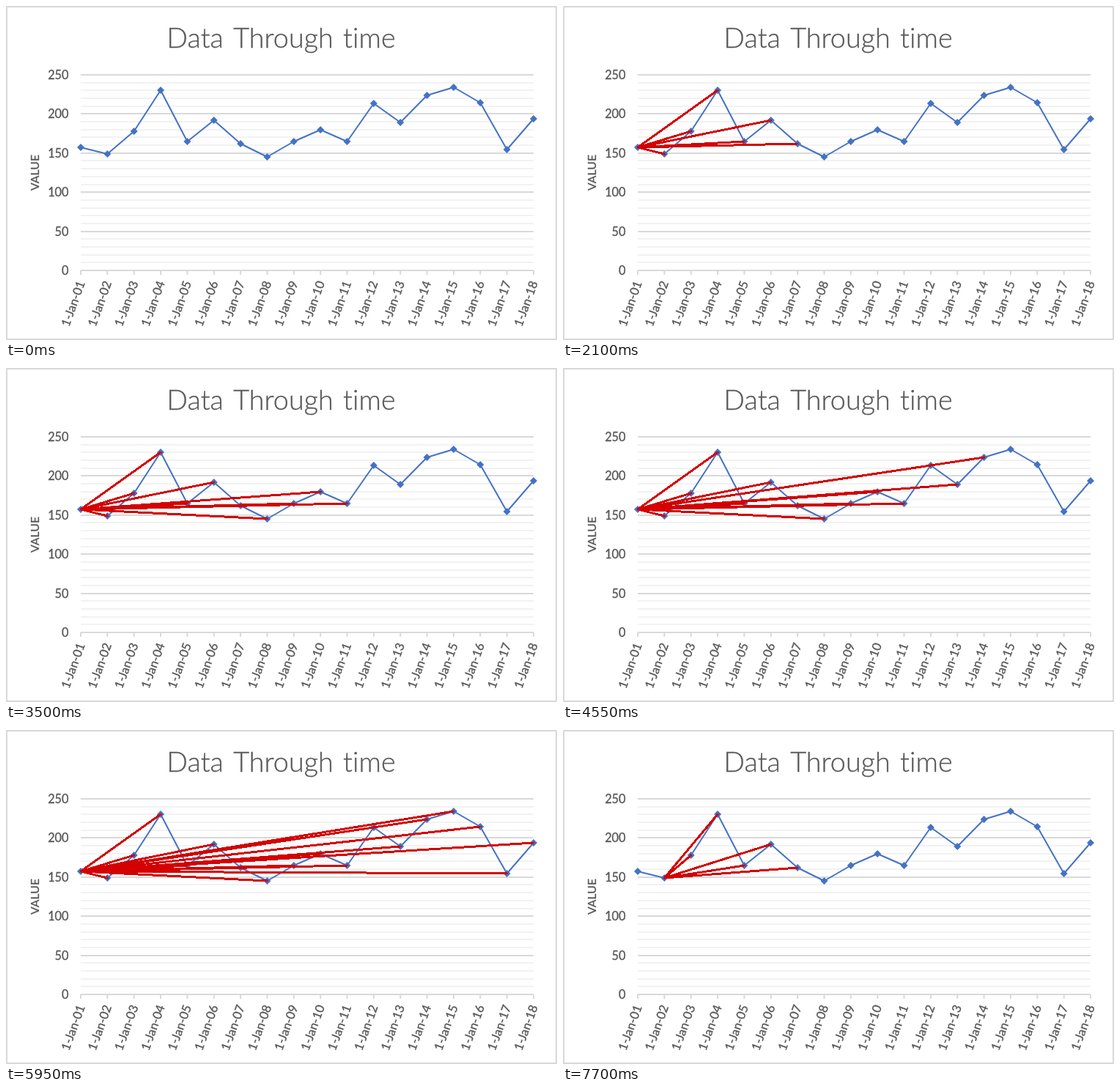
An HTML page with a canvas for the animation above (8000 ms loop, 752 px wide and 456 px high).

```html
<!DOCTYPE html>
<html lang="en">
<head>
<meta charset="utf-8">
<title>Data Through time</title>
<style>
  html, body { margin: 0; width: 100%; height: 100%; overflow: hidden; background: #fff; }
  canvas, svg { position: absolute; left: 0; top: 0; }
  path { fill: none; stroke: #d40000; stroke-width: 3; stroke-linecap: round; shape-rendering: crispEdges; }
</style>
</head>
<body>
<canvas width="752" height="456"></canvas>
<svg width="752" height="456"><path/></svg>
<script>
const ctx = document.querySelector('canvas').getContext('2d');
const fan = document.querySelector('path');
const LOOP = 8000, STEP = 350;
const LEFT = 102, RIGHT = 720, TOP = 94, BASE = 361;
const GREY = '#595959', BLUE = '#4472c4', GRID = '#d9d9d9';
const heights = [193, 202, 171, 115, 185, 156, 188, 206, 185, 169, 185, 133, 159, 122, 111, 132, 196, 154];
const last = heights.length - 1;
const points = heights.map((y, i) => [LEFT + (RIGHT - LEFT) * i / last, y]);

function line(path, color, width = 2) {
  ctx.strokeStyle = color;
  ctx.lineWidth = width;
  ctx.beginPath();
  path.forEach(([x, y]) => ctx.lineTo(x, y));
  ctx.stroke();
}

function label(text, x, y, size, align, angle = 0, weight = 400) {
  ctx.save();
  ctx.translate(x, y);
  ctx.rotate(angle * Math.PI / 180);
  ctx.font = `${weight} ${size}px Lato, sans-serif`;
  ctx.textAlign = align;
  ctx.fillStyle = ctx.strokeStyle = GREY;
  ctx.lineWidth = 0.35;
  ctx.fillText(text, 0, 0);
  ctx.strokeText(text, 0, 0);
  ctx.restore();
}

function drawChart() {
  ctx.fillStyle = '#fff';
  ctx.fillRect(0, 0, 752, 456);
  ctx.strokeStyle = GRID;
  ctx.lineWidth = 2;
  ctx.strokeRect(1, 1, 750, 454);

  for (let v = 0; v <= 250; v += 10) {
    const y = Math.round(BASE - (BASE - TOP) * v / 250);
    const major = v % 50 === 0;
    line([[LEFT, y], [RIGHT, y]], major ? GRID : '#f2f2f2');
    if (major) label(v, 85.5, y + 5.5, 16.3, 'right');
  }

  ctx.letterSpacing = '0.01px'; // turns ligatures off
  ctx.wordSpacing = '3px';
  label('Data Through time', 375.5, 57, 37.8, 'center', 0, 300);
  label('VALUE', 45, 227.5, 15.8, 'center', -90);

  points.forEach(([x], i) => {
    line([[x, BASE], [x, BASE + 6]], GRID);
    label('1-Jan-' + String(i + 1).padStart(2, '0'), x + 6, 378, 16.6, 'right', -70);
  });

  ctx.lineJoin = 'round';
  line(points, BLUE);
  ctx.fillStyle = BLUE;
  for (const [x, y] of points) {
    ctx.beginPath();
    ctx.moveTo(x, y - 5);
    ctx.lineTo(x + 5, y);
    ctx.lineTo(x, y + 5);
    ctx.lineTo(x - 5, y);
    ctx.fill();
  }
}

// Each start point fans out to every later point, one line per step.
function drawFan(step) {
  let from = 0;
  while (step > last - from) step -= last - from++;
  const ends = points.slice(from + 1, from + 1 + step);
  fan.setAttribute('d', ends.map(end => `M${points[from]}L${end}`).join(''));
}

function frame(now) {
  drawChart();
  drawFan(Math.floor(now % LOOP / STEP));
  requestAnimationFrame(frame);
}
requestAnimationFrame(frame);
</script>
</body>
</html>
```
